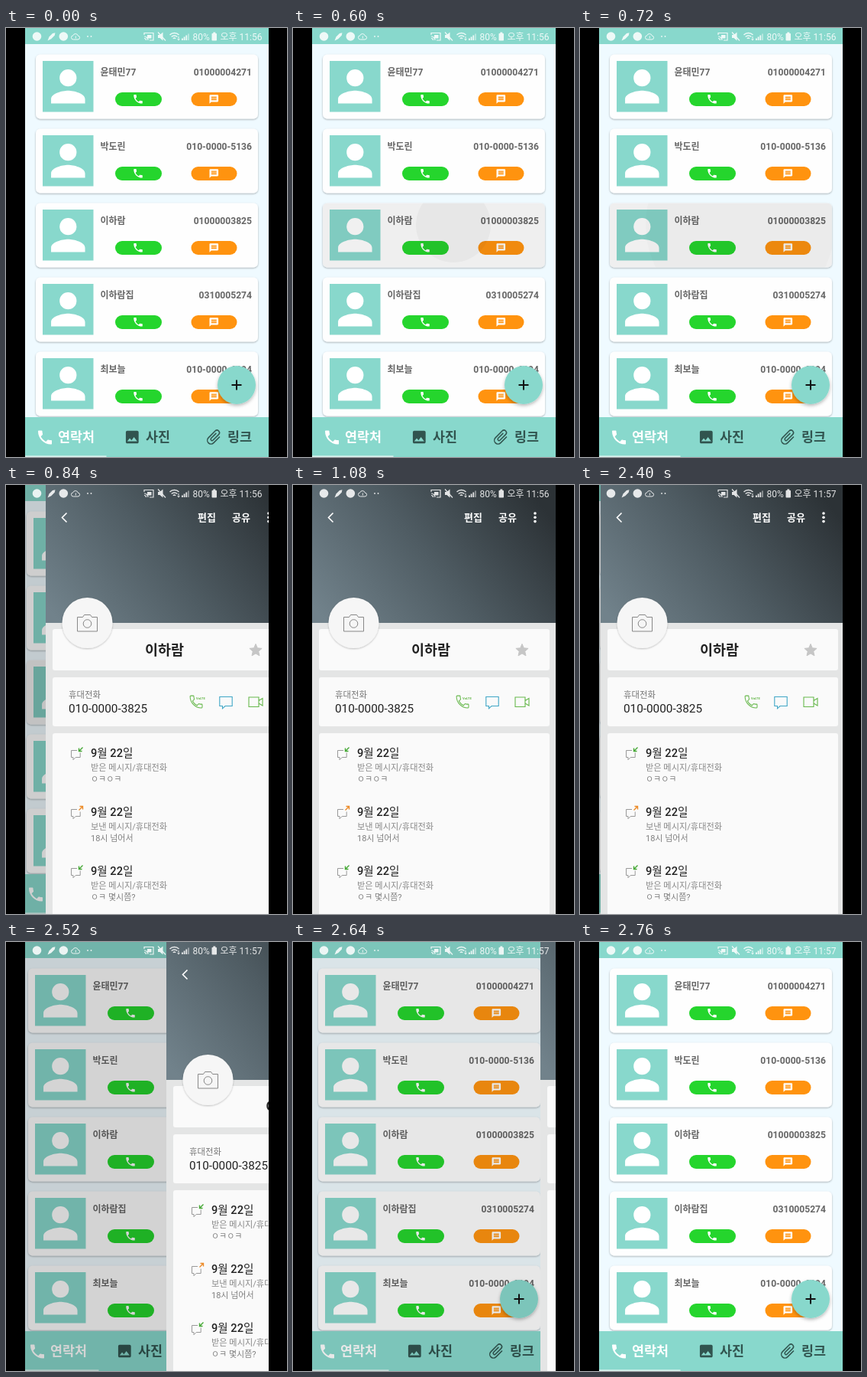
Animation, 368 px wide and 560 px high, one loop 3000 ms. Source, as an HTML page:

```html
<!DOCTYPE html>
<html lang="ko">
<head>
<meta charset="utf-8">
<title>연락처</title>
<style>
html, body { margin: 0; width: 100%; height: 100%; overflow: hidden; background: #000; }
svg { display: block; width: 100vw; height: 100vh; }
text { font-family: Roboto, "Noto Sans CJK KR", "Noto Sans CJK", sans-serif; }
</style>
</head>
<body>
<svg id="stage" viewBox="0 0 368 560"></svg>
<script>
const LOOP = 3000, STEP = 120, WIDTH = 319;
const TEAL = '#88d8cc', DARK = '#31544f', GREEN = '#67b84c';

const ICON = {
  person: 'M12 12a4 4 0 1 0 0-8 4 4 0 0 0 0 8zm0 2c-2.67 0-8 1.34-8 4v2h16v-2c0-2.66-5.33-4-8-4z',
  phone: 'M6.62 10.79c1.44 2.83 3.76 5.14 6.59 6.59l2.2-2.2c.27-.27.67-.36 1.02-.24 1.12.37 2.33.57 3.57.57.55 0 1 .45 1 1V20c0 .55-.45 1-1 1C10.61 21 3 13.39 3 4c0-.55.45-1 1-1h3.5c.55 0 1 .45 1 1 0 1.25.2 2.45.57 3.57.11.35.03.74-.25 1.02z',
  message: 'M20 2H4c-1.1 0-2 .9-2 2v18l4-4h14c1.1 0 2-.9 2-2V4c0-1.1-.9-2-2-2zm-2 12H6v-2h12zm0-3H6V9h12zm0-3H6V6h12z',
  photo: 'M21 19V5c0-1.1-.9-2-2-2H5c-1.1 0-2 .9-2 2v14c0 1.1.9 2 2 2h14c1.1 0 2-.9 2-2zM8.5 13.5l2.5 3.01L14.5 12l4.5 6H5z',
  clip: 'M16.5 6v11.5a4 4 0 0 1-8 0V5a2.5 2.5 0 0 1 5 0v10.5a1 1 0 0 1-2 0V6H10v9.5a2.5 2.5 0 0 0 5 0V5a4 4 0 0 0-8 0v12.5a5.5 5.5 0 0 0 11 0V6z'
};

const contacts = [
  ['윤태민77', '01000004271'],
  ['박도린', '010-0000-5136'],
  ['이하람', '01000003825'],
  ['이하람집', '0310005274'],
  ['최보늘', '010-0000-6194']
];
const messages = [
  ['받은', 'ㅇㅋㅇㅋ'],
  ['보낸', '18시 넘어서'],
  ['받은', 'ㅇㅋ 몇시쯤?']
];

const rect = (x, y, w, h, fill, more = '') =>
  `<rect x="${x}" y="${y}" width="${w}" height="${h}" fill="${fill}" ${more}/>`;
const circle = (x, y, r, fill, more = '') =>
  `<circle cx="${x}" cy="${y}" r="${r}" fill="${fill}" ${more}/>`;
const text = (x, y, size, fill, str, weight = 400, more = '') =>
  `<text x="${x}" y="${y}" font-size="${size}" fill="${fill}" font-weight="${weight}" ${more}>${str}</text>`;
const line = (d, color, width = 1, more = '') =>
  `<path d="${d}" fill="none" stroke="${color}" stroke-width="${width}" ${more}/>`;
// Icons live on a 24-unit grid and are placed by their centre.
const icon = (name, x, y, scale, fill, turn = 0) =>
  `<path d="${ICON[name]}" fill="${fill}" transform="translate(${x} ${y}) rotate(${turn}) scale(${scale}) translate(-12 -12)"/>`;

function contactCard([name, number], i) {
  return `<g transform="translate(0 ${i * 97})">` +
    rect(39, 34.5, 291, 84, '#fefefe', 'rx="6" filter="url(#soft)"') +
    rect(48, 43, 66.5, 66.5, TEAL) + icon('person', 81.3, 76.3, 2.78, '#fff') +
    text(123.5, 62, 12, '#666', name, 700) +
    text(322, 62, 12.1, '#666', number, 700, 'text-anchor="end"') +
    rect(143, 84, 61, 18, '#25d52d', 'rx="9"') + icon('phone', 173, 92.8, .64, '#fff') +
    rect(242.5, 84, 60, 18, '#ff930f', 'rx="9"') + icon('message', 272.3, 93, .58, '#fff') +
    '</g>';
}

function listScreen() {
  return rect(25, 0, WIDTH, 560, '#effaff') +
    contacts.map(contactCard).join('') +
    `<g id="press" clip-path="url(#pressed)">` +
    rect(39, 228.5, 291, 84, '#000', 'opacity=".06"') +
    `<circle id="ripple" cx="210" cy="257" fill="#000"/></g>` +
    rect(25, 0, WIDTH, 21, TEAL) +
    rect(25, 508, WIDTH, 52, TEAL) + rect(25, 558.3, 106.5, 1.7, '#d9f3ee') +
    icon('phone', 51, 534.5, 1, '#fff') + text(68, 540, 17.4, '#fff', '연락처', 700) +
    icon('photo', 165.3, 534, .93, DARK) + text(183, 540, 17.4, DARK, '사진', 700) +
    icon('clip', 272, 534, 1, DARK, 45) + text(290, 540, 17.4, DARK, '링크', 700) +
    circle(302, 466, 25, TEAL, 'filter="url(#lift)"') +
    line('M295.5 466h13M302 459.5v13', '#111', 2);
}

function messageRow([kind, body], i) {
  const sent = kind === '보낸';
  const arrow = sent ? 'M68.5 347.5l5-5M69.5 342.5h4v4' : 'M73.5 342.5l-5 5M68.5 343.5v4h4';
  return `<g transform="translate(0 ${i * 77})">` +
    line('M66 346.5h-7.5v9h2.5v3.2l3.2-3.2h6v-6', '#999') +
    line(arrow, sent ? '#ec8a27' : '#45a835', 1.4) +
    text(84, 355, 14.6, '#222', '9월 22일', 500) +
    text(84, 372.5, 11.2, '#888', kind + ' 메시지/휴대전화') +
    text(84, 388, 11, '#808080', body) + '</g>';
}

function starPath(x, y, r) {
  const points = Array.from({ length: 10 }, (_, i) => {
    const a = (i / 5 - .5) * Math.PI, q = i % 2 ? r * .46 : r;
    return (x + q * Math.cos(a)).toFixed(2) + ' ' + (y + q * Math.sin(a)).toFixed(2);
  });
  return `<path d="M${points.join('L')}z" fill="#c6c6c6" stroke="#c6c6c6" stroke-linejoin="round"/>`;
}

function detailScreen() {
  const panel = (y, h) => rect(34, y, 302, h, '#fafafa', 'rx="3"');
  return rect(25, 0, WIDTH, 560, '#e4e5e5') +
    rect(25, 0, WIDTH, 180, 'url(#sky)') +
    line('M52.5 36.5l-6 6 6 6', '#fff', 1.6) +
    text(224, 47, 13, '#fff', '편집', 700) + text(269, 47, 13, '#fff', '공유', 700) +
    [37, 42.3, 47.6].map(y => circle(317, y, 1.8, '#fff')).join('') +
    panel(188, 54) + panel(251, 64) + panel(324, 250) +
    circle(79.5, 180, 33, '#f6f6f6', 'filter="url(#halo)"') +
    line('M66.5 172.5h7l2-3h8l2 3h7v18.5h-26z', '#888') +
    circle(79.5, 181, 5.3, 'none', 'stroke="#888"') +
    text(155, 222, 18.5, '#222', '이하람', 700) + starPath(300, 216, 8.5) +
    text(55, 277.5, 11.4, '#777', '휴대전화') +
    text(55, 297, 15.3, '#222', '010-0000-3825') +
    `<path d="${ICON.phone}" fill="none" stroke="${GREEN}" stroke-width="1.2" transform="translate(211.5 272.5) scale(.88)"/>` +
    text(222, 280, 4.2, GREEN, 'VoLTE', 700) +
    line('M252.8 276.5h16.4v12h-9.2l-3.5 3.3v-3.3h-3.7z', '#3fa6c6', 1.1) +
    line('M291 277h13v12.5h-13zM304 281.5l5-3v9.5l-5-3', GREEN, 1.1) +
    messages.map(messageRow).join('');
}

function statusBar() {
  const bars = [0, 1, 2, 3].map(i =>
    rect(230 + i * 2.7, 13.5 - i * 2, 1.8, 2.5 + i * 2, '#fff', i > 2 ? 'opacity=".5"' : '')).join('');
  return `<g opacity=".86">` +
    circle(40.5, 11, 5.8, '#fff') +
    '<path d="M54.5 16.5l2-5 4.5-4.5 3.5-.8-.8 3.5-4.5 4.5z" fill="#fff"/>' +
    circle(75.3, 11, 5.8, '#fff') +
    line('M88.5 15h5.5a2.4 2.4 0 0 0 .3-4.8 3.4 3.4 0 0 0-6.5-.4 2.6 2.6 0 0 0 .7 5.2zM91.3 10.5v3', '#fff', 1) +
    circle(107, 11, .9, '#fff') + circle(111.5, 11, .9, '#fff') +
    line('M181 9V6.5h12v9.5h-5M181 11a5 5 0 0 1 5 5M181 13.5a2.5 2.5 0 0 1 2.5 2.5', '#fff', 1.2) +
    rect(185, 9, 5.5, 4.5, '#fff') +
    '<path d="M199 9h2.5l4-3.5v11l-4-3.5H199z" fill="#fff"/>' + line('M199 5.5l10 11', '#fff', 1.2) +
    line('M214.5 9a8.5 8.5 0 0 1 12 0M216.7 11.5a5.5 5.5 0 0 1 7.6 0M218.8 13.7a2.5 2.5 0 0 1 3.4 0', '#fff', 1.4) +
    line('M226 11v5M224.5 14.5l1.5 1.5 1.5-1.5', '#fff', 1) + bars +
    text(244.5, 15.5, 12, '#fff', '80%') +
    rect(269.5, 7, 6.5, 9.5, '#fff', 'rx=".8"') + rect(271.3, 5.5, 3, 2, '#fff') +
    '<text id="clock" x="280.5" y="15.5" font-size="12" fill="#fff"></text></g>';
}

const shadow = (id, dy, blur, alpha) =>
  `<filter id="${id}" x="-20%" y="-20%" width="140%" height="150%"><feDropShadow dx="0" dy="${dy}" stdDeviation="${blur}" flood-color="#000" flood-opacity="${alpha}"/></filter>`;

const $ = id => document.getElementById(id);
$('stage').innerHTML = '<defs>' + shadow('soft', 1, .9, .32) + shadow('lift', 2, 2, .28) + shadow('halo', .8, 1.3, .28) +
  '<clipPath id="screen"><rect x="25" width="319" height="560"/></clipPath>' +
  '<clipPath id="pressed"><rect x="39" y="228.5" width="291" height="84" rx="6"/></clipPath>' +
  '<linearGradient id="sky" gradientUnits="userSpaceOnUse" x1="55" y1="195" x2="305" y2="0">' +
  '<stop offset="0" stop-color="#71828b"/><stop offset=".5" stop-color="#4f5c63"/><stop offset="1" stop-color="#2c3236"/></linearGradient></defs>' +
  rect(0, 0, 368, 560, '#000') + '<g clip-path="url(#screen)">' +
  `<g id="list">${listScreen()}</g>` + rect(25, 0, WIDTH, 560, '#000', 'id="dim"') +
  `<g id="detail">${detailScreen()}</g>${statusBar()}</g>`;

// Each pose: start time, detail offset, list offset, dimming.
const poses = [
  [0, WIDTH, 0, 0],
  [840, 27, -12, .19],
  [960, 3, -13, .22],
  [1080, 0, -13, .22],
  [2400, 2, -13, .22],
  [2520, 185, -10, .17],
  [2640, 299, -6, .09],
  [2760, WIDTH, 0, 0]
];

function draw(time) {
  const t = Math.floor(time % LOOP / STEP) * STEP;
  const [, detailX, listX, dim] = poses.filter(p => p[0] <= t).pop();
  $('detail').setAttribute('transform', `translate(${detailX} 0)`);
  $('list').setAttribute('transform', `translate(${listX} 0)`);
  $('dim').setAttribute('opacity', dim);

  // The ripple grows from the touch point and fades out.
  const age = Math.max(0, (t - 600) / STEP);
  $('press').setAttribute('visibility', t >= 600 && t < 1080 ? 'visible' : 'hidden');
  $('ripple').setAttribute('r', 49 + age * 75);
  $('ripple').setAttribute('opacity', Math.max(0, .035 * (1 - age / 2)));
  $('clock').textContent = t < 1320 ? '오후 11:56' : '오후 11:57';
}

const start = performance.now();
function tick() {
  draw(performance.now() - start);
  requestAnimationFrame(tick);
}
tick();
</script>
</body>
</html>
```
